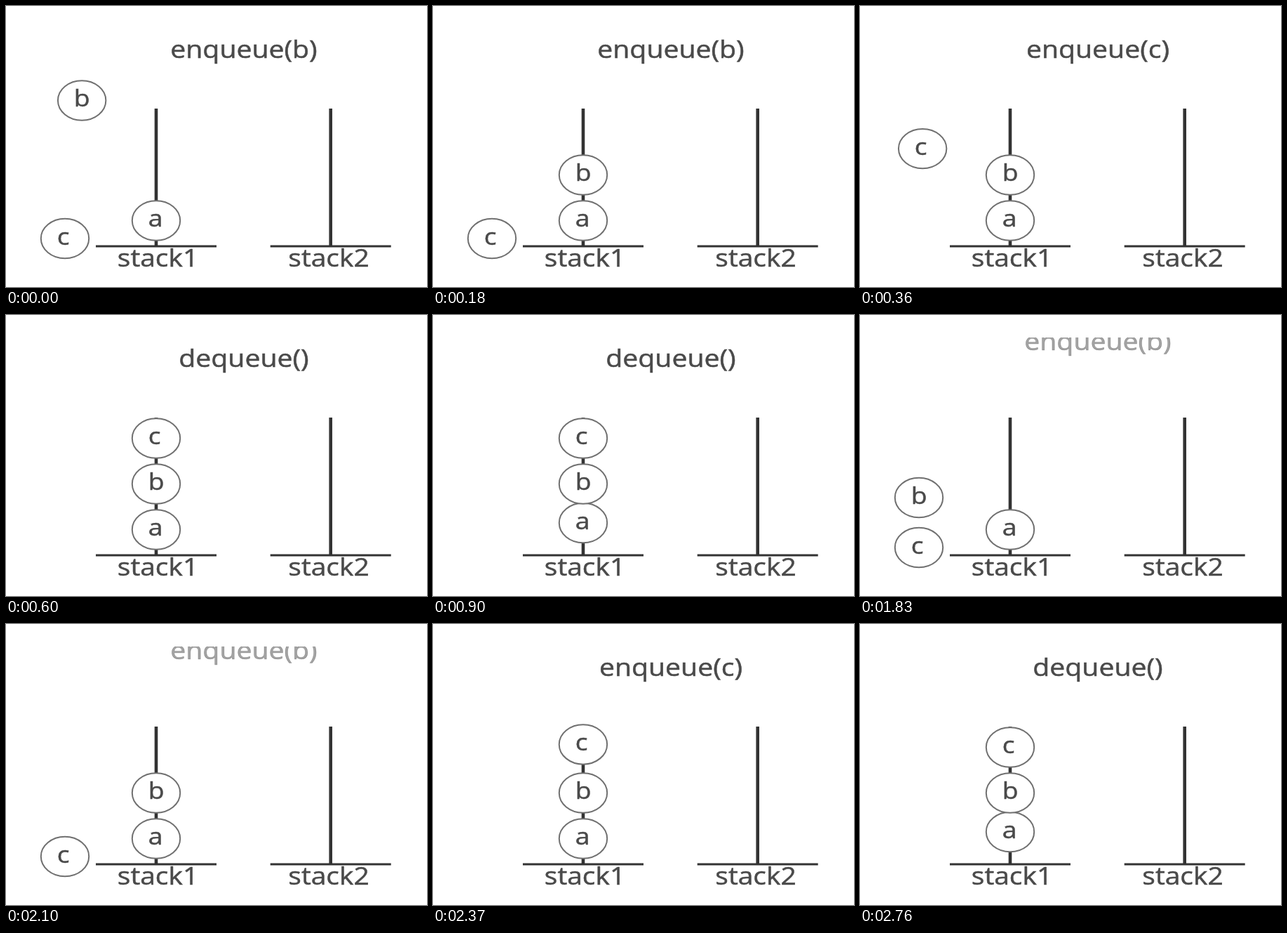
An HTML page with a canvas for the animation above (2.79 s loop, 600x400 px).

```html
<!DOCTYPE html>
<html lang="en">
<head>
<meta charset="utf-8">
<style>
  html, body { margin: 0; width: 100%; height: 100%; overflow: hidden; background: #fff; }
  canvas { display: block; }
</style>
</head>
<body>
<canvas id="stage" width="600" height="400"></canvas>
<script>
const ctx = document.getElementById('stage').getContext('2d');
const LOOP = 2790, STEP = 30, RESET = 1260, CYCLE = 1890;
const FLIGHT = 138;
const WIDEN = 1.13;           // the scene is drawn on slightly wide pixels
const HOME_X = 84, POLE_X = 214;

// lift and drop are the heights of the two control points of the flight path
const balls = [
  { name: 'a', home: 186.5, rest: 305.5, start: 1525, lift: 50, drop: 50 },
  { name: 'b', home: 260, rest: 240.5, start: 1852, lift: 51, drop: 51 },
  { name: 'c', home: 331, rest: 175.5, start: 2233.5, lift: -90, drop: 51 }
];
const titles = [
  { text: 'enqueue(a)', enter: 1470, leave: 1740 },
  { text: 'enqueue(b)', enter: 1800, leave: 2070 },
  { text: 'enqueue(c)', enter: 2190, leave: 2370 },
  { text: 'dequeue()', enter: 2430, leave: Infinity }
];

const ramp = (t, start, length) => Math.min(1, Math.max(0, (t - start) / length));
const smooth = p => p * p * (3 - 2 * p);
const bezier = (s, a, b, c, d) => {
  const r = 1 - s;
  return r * r * r * a + 3 * r * r * s * b + 3 * r * s * s * c + s * s * s * d;
};

function text(str, x, y, size, align = 'center') {
  ctx.save();
  ctx.translate(x, y);
  ctx.scale(WIDEN, 1);
  ctx.font = size + 'px "Open Sans", "Noto Sans", sans-serif';
  ctx.textAlign = align;
  ctx.fillStyle = ctx.strokeStyle = '#4a4a4a';
  ctx.lineWidth = 0.5;
  ctx.fillText(str, 0, 0);
  ctx.strokeText(str, 0, 0);
  ctx.restore();
}

function drawStack(x, label, labelX) {
  ctx.fillStyle = '#333';
  ctx.fillRect(x - 2.3, 146, 4.6, 196);
  ctx.fillRect(x - 86, 340.5, 172, 3);
  text(label, labelX, 371, 34.5);
}

function drawBall(name, x, y, alpha) {
  ctx.globalAlpha = alpha;
  ctx.beginPath();
  ctx.ellipse(x, y, 34.2, 28.2, 0, 0, 2 * Math.PI);
  ctx.fillStyle = '#fff';
  ctx.fill();
  ctx.strokeStyle = '#707070';
  ctx.lineWidth = 2;
  ctx.stroke();
  text(name, x - 11.3, y + 8.5, 33, 'left');
  ctx.globalAlpha = 1;
}

function drawTitle({ text: str, enter, leave }, t, fade) {
  const shown = ramp(t, enter, 60) - ramp(t, leave, 60);
  if (shown <= 0) return;
  ctx.globalAlpha = shown * fade;
  text(str, 339, 73.5 - 48 * (1 - shown), 34.7);
  ctx.globalAlpha = 1;
}

function draw(t) {
  ctx.fillStyle = '#fff';
  ctx.fillRect(0, 0, 600, 400);
  ctx.save();
  ctx.beginPath();
  ctx.rect(0, 32, 600, 341);
  ctx.clip();
  drawStack(POLE_X, 'stack1', 216.5);
  drawStack(462.7, 'stack2', 460);

  const reset = ramp(t, RESET - STEP, 180);
  const bump = smooth(ramp(t, 2640, 100)) - smooth(ramp(t, 2800, 110));
  for (const { name, home, rest, start, lift, drop } of balls) {
    const s = ramp(t, start, FLIGHT);
    const x = bezier(s, HOME_X, HOME_X, POLE_X, POLE_X);
    const y = bezier(s, home, lift, drop, rest) - (name === 'a' ? 9.5 * bump : 0);
    if (reset < 1) drawBall(name, POLE_X, rest, 1 - reset);
    drawBall(name, x, y, reset);
  }
  if (reset < 1) drawTitle(titles[3], 2 * LOOP, 1 - reset);
  for (const title of titles) drawTitle(title, t, 1);
  ctx.restore();
}

const begin = performance.now();
function tick() {
  const elapsed = (performance.now() - begin) % LOOP;
  const t = Math.floor(elapsed / STEP) * STEP;
  // the loop opens in the middle of a round
  draw(t < RESET ? t + CYCLE : t);
  requestAnimationFrame(tick);
}
tick();
</script>
</body>
</html>
```
